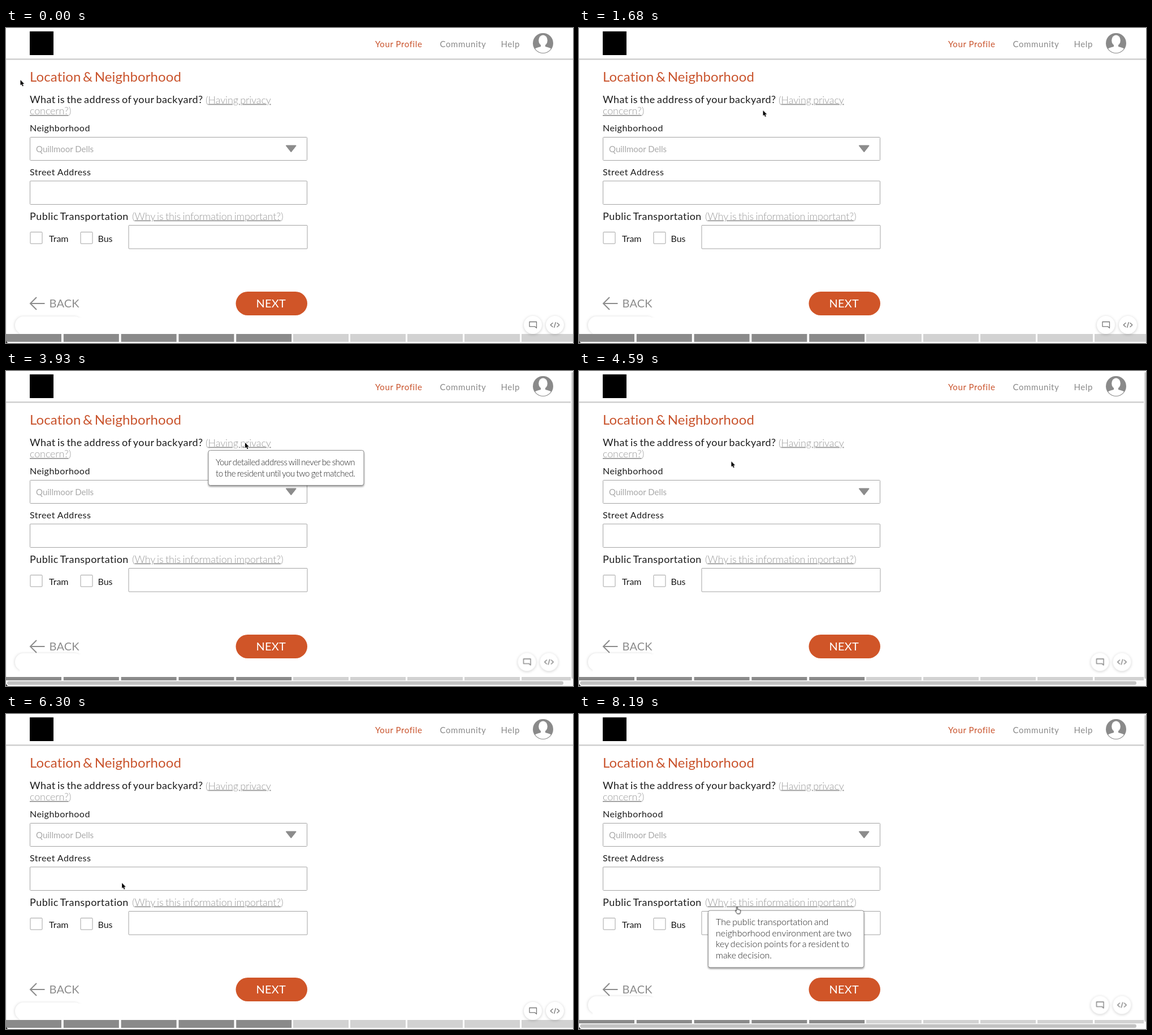
These frames come from a looping animation (1003x558 px, 8220 ms). An HTML page:

```html
<!DOCTYPE html>
<html lang="en">
<head>
<meta charset="utf-8">
<title>Location form</title>
<style>
  html, body { margin: 0; width: 100%; height: 100%; overflow: hidden; background: #fff; }
  svg { display: block; width: 1003px; height: 558px; }
  text { font: 400 16px Lato, "Open Sans", sans-serif; fill: #1c1c1c; white-space: pre; }

  .nav text { font-size: 15px; letter-spacing: .6px; fill: #8a8a8a; }
  .nav .on, .title { fill: #c9532c; }
  .title { font-size: 24px; letter-spacing: .1px; word-spacing: -2.7px; }
  .ask { font-size: 18px; letter-spacing: .45px; word-spacing: -1.7px; }
  .label { letter-spacing: .45px; }
  .hint { font-size: 18px; font-weight: 300; letter-spacing: -.12px; word-spacing: -1.4px; fill: #999; }
  .hint tspan { text-decoration: underline; text-decoration-thickness: 1px; }
  .value { font-size: 15px; fill: #a9a9a9; }
  .big { font-size: 20px; letter-spacing: .2px; fill: #8c8c8c; }
  .tip text { font-weight: 300; fill: #222; word-spacing: -1.4px; }
  .tip .tight { font-size: 15px; letter-spacing: -.43px; word-spacing: -1px; }
  .tip rect { fill: #fff; stroke: #8d8d8d; filter: drop-shadow(0 2px 1.5px #0006); }

  .field { fill: #fff; stroke: #a3a3a3; }
  .float { fill: #fff; filter: drop-shadow(0 1px 2.5px #0003); }
  .icon { fill: none; stroke: #777; stroke-width: 1.3; stroke-linejoin: round; stroke-linecap: round; }

  .anim { animation: 8.22s linear infinite; }
  #tip1 { opacity: 0; animation-name: tip1; }
  #tip2 { opacity: 0; animation-name: tip2; }
  #bars { opacity: 0; animation-name: bars; animation-timing-function: step-end; }
  #tools { animation-name: tools; animation-timing-function: step-end; }
  #pill { animation-name: pill; animation-timing-function: step-end; }
  #cursor { animation-name: cursor; animation-timing-function: ease-in-out; }
  #arrow { animation-name: arrow; animation-timing-function: step-end; }
  #hand { opacity: 0; animation-name: hand; animation-timing-function: step-end; }

  @keyframes tip1 {
    0%, 29.2% { opacity: 0; }
    32.85%, 51.82% { opacity: 1; }
    55.6%, 100% { opacity: 0; }
  }
  @keyframes tip2 {
    0%, 93.43% { opacity: 0; }
    96.7%, 100% { opacity: 1; }
  }
  @keyframes bars {
    0%, 56.57% { opacity: 0; }
    28.83%, 93.43%, 100% { opacity: 1; }
  }
  @keyframes tools {
    0%, 56.57% { transform: none; }
    28.83%, 93.43%, 100% { transform: translate(-10.5px, -10.5px); }
  }
  @keyframes pill {
    0%, 56.57% { transform: none; }
    28.83%, 93.43%, 100% { transform: translateY(-11px); }
  }
  @keyframes cursor {
    0%, .36% { transform: translate(25.5px, 92px); }
    17.15%, 20.44% { transform: translate(325.5px, 146px); }
    34.67%, 42.34% { transform: translate(424px, 126px); }
    45.62%, 47.81% { transform: translate(423px, 127px); animation-timing-function: ease-in; }
    55.84% { transform: translate(269.5px, 160px); animation-timing-function: ease-out; }
    66.42% { transform: translate(207.5px, 259px); }
    87.23% { transform: translate(202.5px, 342px); }
    99.64%, 100% { transform: translate(279.5px, 341.5px); }
  }
  @keyframes arrow {
    0% { opacity: 1; }
    92.7%, 100% { opacity: 0; }
  }
  @keyframes hand {
    0% { opacity: 0; }
    92.7%, 100% { opacity: 1; }
  }
</style>
</head>
<body>
<svg viewBox="0 0 1003 558">
  <defs>
    <clipPath id="face"><circle cx="950" cy="27" r="17"/></clipPath>
  </defs>
  <rect width="1003" height="558" fill="#fff"/>
  <path d="M.5 57V542" stroke="#eee"/>

  <!-- header -->
  <rect y="54" width="1003" height="2.5" fill="#cfcfcf"/>
  <rect x="42" y="6" width="42" height="42"/>
  <g class="nav">
    <text class="on" x="653" y="34">Your Profile</text>
    <text x="767.5" y="34">Community</text>
    <text x="875.5" y="34">Help</text>
  </g>
  <circle cx="950" cy="27" r="18" fill="#8a8a8a"/>
  <g clip-path="url(#face)" fill="#fff">
    <ellipse cx="950" cy="22" rx="7.8" ry="9.5"/>
    <path d="M946 28h8v5q10 2 13 6v7h-34v-7q3-4 13-6z"/>
  </g>

  <!-- form -->
  <text class="title" x="42" y="94.5">Location &amp; Neighborhood</text>
  <text class="ask" x="42" y="133">What is the address of your backyard?</text>
  <text class="hint" x="353" y="133.5">(<tspan>Having privacy</tspan></text>
  <text class="hint" x="42" y="153"><tspan>concern?</tspan>)</text>
  <text class="label" x="42" y="182.5">Neighborhood</text>
  <rect class="field" x="42.5" y="193.5" width="490" height="41" rx="1"/>
  <text class="value" x="53" y="219.5">Quillmoor Dells</text>
  <path d="M496 208.5h16.5l-8.2 10.5z" fill="#8c8c8c" stroke="#8c8c8c" stroke-width="2" stroke-linejoin="round"/>
  <text class="label" x="42" y="260.5">Street Address</text>
  <rect class="field" x="42.5" y="271" width="490" height="41.5" rx="1"/>
  <text class="ask" x="42" y="339.5">Public Transportation</text>
  <text class="hint" x="223" y="339.5">(<tspan>Why is this information important?</tspan>)</text>
  <rect class="field" x="43" y="361.5" width="21" height="20.5" rx="1"/>
  <text x="76" y="378.5">Tram</text>
  <rect class="field" x="132" y="361.5" width="21" height="20.5" rx="1"/>
  <text x="162.5" y="378.5">Bus</text>
  <rect class="field" x="217" y="349.5" width="316" height="41.5" rx="1"/>

  <path d="M68.5 488H43M54 477L43 488l11 11" fill="none" stroke="#8c8c8c" stroke-width="2"/>
  <text class="big" x="76.5" y="494.5">BACK</text>
  <rect x="406.5" y="467" width="126.5" height="42" rx="21" fill="#d05528"/>
  <text class="big" x="442.5" y="495" style="fill:#fff">NEXT</text>

  <!-- floating controls and progress -->
  <g id="pill" class="anim"><rect class="float" x="16" y="511" width="120" height="31" rx="15" style="filter:drop-shadow(-1px 0 2px #0002)"/><rect x="24" y="513" width="120" height="40" fill="#fff"/></g>
  <g id="steps"></g>
  <g id="bars" class="anim">
    <rect y="548" width="1003" height="10" fill="#fafafa"/>
    <rect x="2" y="549.5" width="984" height="6.5" rx="3.2" fill="#c2c2c2"/>
    <rect x="999" width="4" height="558" fill="#fafafa"/>
    <rect x="1000.5" y="2" width="3" height="543" rx="1.5" fill="#c6c6c6"/>
  </g>
  <path d="M0 554v4h4q-3-1-4-4z" fill="#222"/>
  <g id="tools" class="anim">
    <circle class="float" cx="932" cy="526" r="16"/>
    <circle class="float" cx="971" cy="526" r="16"/>
    <path class="icon" d="M926 520.5h12.5v11l-3-2.7H926z"/>
    <path class="icon" d="M967 522.5l-3.8 3.5 3.8 3.5M975 522.5l3.8 3.5-3.8 3.5M972.3 521.5l-2.6 9"/>
  </g>

  <!-- tooltips -->
  <g id="tip1" class="anim tip">
    <rect x="358" y="140.5" width="275" height="62" rx="3.5"/>
    <text class="tight" x="371" y="166.5">Your detailed address will never be shown</text>
    <text class="tight" x="371" y="186.5">to the resident until you two get matched.</text>
  </g>
  <g id="tip2" class="anim tip">
    <rect x="228.5" y="348" width="275.5" height="101" rx="3.5"/>
    <text x="242" y="374">The public transportation and</text>
    <text x="242" y="393.6">neighborhood environment are two</text>
    <text x="242" y="413.2">key decision points for a resident to</text>
    <text x="242" y="432.8">make decision.</text>
  </g>

  <g id="cursor" class="anim" stroke-linejoin="round">
    <path id="arrow" class="anim" d="M0 0v9.5l2.1-1.9 1.5 3.6 1.7-.7-1.5-3.5h2.9z" fill="#000" stroke="#fff" stroke-width="1.2" paint-order="stroke"/>
    <path id="hand" class="anim" d="M-1 1q1-1.6 2 0v4l1-.4 1 .6 1-.3 1 .8 1.2.3v3.5l-1.2 3H.5l-3-4q-1.2-1.8.2-2l1.3 1z" fill="#fff" stroke="#222"/>
  </g>
</svg>
<script>
  const steps = document.getElementById('steps');
  for (let i = 0; i < 10; i++) {
    const bar = document.createElementNS('http://www.w3.org/2000/svg', 'rect');
    const x = i < 5 ? i * 101.8 : 508 + (i - 5) * 101;
    const attrs = { x, y: 542, width: 98, height: 14, fill: i < 5 ? '#8a8a8a' : '#d2d2d2' };
    for (const key in attrs) bar.setAttribute(key, attrs[key]);
    steps.append(bar);
  }
</script>
</body>
</html>
```
